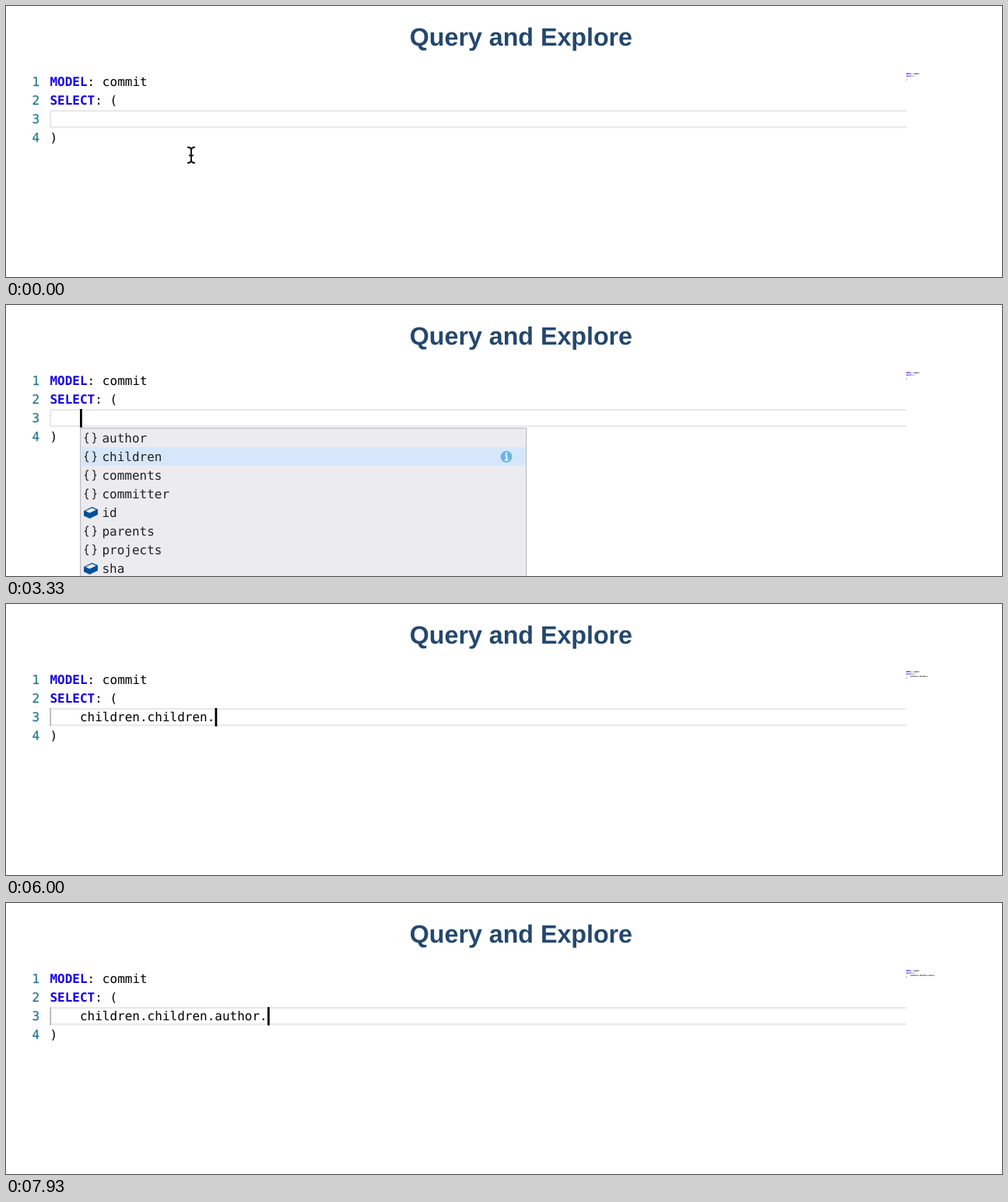
An HTML page for the animation above (8 s loop, 1280 by 349 pixels).

```html
<!DOCTYPE html>
<html lang="en">
<head>
<meta charset="utf-8">
<title>Query and Explore</title>
<style>
  html, body { margin: 0; width: 100%; height: 100%; overflow: hidden; background: #fff; }
  svg { display: block; width: 100%; height: 100%; }
  text { font: 16px "DejaVu Sans Mono", monospace; white-space: pre; text-rendering: geometricPrecision; }
  .title { font: bold 32.2px "Liberation Sans", Arial, sans-serif; fill: #24476f; }
  .num { fill: #237893; stroke: #237893; stroke-width: .25; }
  .key { font-weight: bold; fill: #1500e6; }
  .item { fill: #222; }
  .mini text { stroke: #000; stroke-width: .6; }
  .mini .key { stroke: #1500e6; }
</style>
</head>
<body>
<svg viewBox="0 0 1280 349">
  <defs>
    <path id="braces" fill="none" stroke="#333" stroke-width="1.4"
      d="M6 -6.5Q3.3 -6.5 3.3 -4.2V-2Q3.3 0 1 0Q3.3 0 3.3 2V4.2Q3.3 6.5 6 6.5M11.2 -6.5Q13.9 -6.5 13.9 -4.2V-2Q13.9 0 16.2 0Q13.9 0 13.9 2V4.2Q13.9 6.5 11.2 6.5"/>
    <g id="cube">
      <path fill="#00529b" d="M0 -2.2L10.5 -7.5L18 -4.2V2.6L7.5 7.6L0 4Z"/>
      <path fill="#eef2f8" d="M2.3 -2.1L10.5 -6L15.7 -3.7L7.5 .3Z"/>
    </g>
  </defs>
  <text class="title" x="518.8" y="51">Query and Explore</text>

  <path d="M1157 135.2H57.2V156.2H1157" fill="none" stroke="#e9e9e9" stroke-width="2.2"/>
  <path id="guide" d="M57.2 134V157.3" stroke="#b4b4b4" stroke-width="1.5"/>
  <g id="code"></g>
  <g id="mini" class="mini"></g>

  <g id="mouse" fill="none" stroke-linecap="round">
    <path id="beam" stroke="#fff" stroke-width="4"
      d="M233.8 182Q238 182 238 186Q238 182 242.2 182M238 185V199M233.8 202Q238 202 238 198Q238 202 242.2 202M235.8 192.5H240.2"/>
    <use href="#beam"/>
    <path stroke="#111" stroke-width="1.9"
      d="M233.8 182Q238 182 238 186Q238 182 242.2 182M238 185V199M233.8 202Q238 202 238 198Q238 202 242.2 202M235.8 192.5H240.2"/>
  </g>

  <g id="popup">
    <rect x=".6" y="158.6" width="573" height="230" fill="#ecebf0" stroke="#bfbfc2" stroke-width="1.2"/>
    <rect id="hover" x="1.2" y="183" width="571.8" height="24" fill="#eeeeee"/>
    <g id="mark">
      <rect x="1.2" y="159.2" width="571.8" height="23.8" fill="#d6e7fb"/>
      <circle cx="548" cy="171.4" r="7.4" fill="#69b5e7"/>
      <path d="M546.4 170H548.4V175.4M546 175.6H550.4" fill="none" stroke="#fff" stroke-width="1.6"/>
      <circle cx="548" cy="167.3" r="1.2" fill="#fff"/>
    </g>
    <g id="items"></g>
  </g>
  <rect id="caret" y="134" width="2.8" height="23.6"/>
</svg>
<script>
const LOOP = 8000, ADVANCE = 9.64, CODE_X = 56.4, CARET_X = 95, ROW = 24;
const $ = id => document.getElementById(id);
const NS = "http://www.w3.org/2000/svg";

function add(parent, tag, attrs, content = "") {
  const el = document.createElementNS(NS, tag);
  for (const k in attrs) el.setAttribute(k, attrs[k]);
  el.textContent = content;
  return parent.appendChild(el);
}

// Each line: keyword, plain text
const lines = [["MODEL", ": commit"], ["SELECT", ": ("], ["", ""], ["", ")"]];

function writeLine(parent, x, y, [key, rest]) {
  if (key) add(parent, "text", { class: "key", x, y }, key);
  return add(parent, "text", { x: x + key.length * ADVANCE, y }, rest);
}

const edits = [];
lines.forEach((line, i) => {
  const y = 103 + i * ROW;
  add($("code"), "text", { class: "num", x: 33.6, y }, i + 1);
  const el = writeLine($("code"), CODE_X, y, line);
  const g = add($("mini"), "g", { transform: `translate(1157 ${88.2 + i * 2.75}) scale(.134)` });
  const small = writeLine(g, 0, 0, line);
  if (i === 2) edits.push(el, small);
});

["author", "children", "comments", "committer", "id", "parents", "projects", "sha"].forEach((name, i) => {
  const cube = name === "id" || name === "sha";
  add($("items"), "use", { href: cube ? "#cube" : "#braces", x: 5, y: 171.4 + i * ROW });
  add($("items"), "text", { class: "item", x: 28.4, y: 177 + i * ROW }, name);
});

// Time, property, value
const steps = [
  [0, "text", ""], [0, "caret", 0], [0, "row", -1], [0, "mouse", 1], [0, "hover", 1],
  [70, "caret", 1], [130, "mouse", 0],
  [600, "caret", 0], [930, "row", 0], [1130, "caret", 1], [1600, "caret", 0],
  [2130, "caret", 1], [2400, "row", 1], [2400, "hover", 0],
  [2670, "caret", 0], [2730, "row", 2], [3200, "caret", 1], [3330, "row", 1],
  [3530, "row", -1], [3530, "text", "children"], [4070, "text", "children."],
  [4600, "caret", 0], [4870, "row", 0], [5130, "caret", 1], [5330, "row", 1], [5600, "caret", 0],
  [5730, "row", -1], [5730, "caret", 1], [5730, "text", "children.children"],
  [6000, "text", "children.children."], [6470, "row", 0],
  [6530, "caret", 0], [7070, "caret", 1],
  [7530, "row", -1], [7530, "text", "children.children.author"],
  [7930, "text", "children.children.author."]
];

const show = (id, on) => $(id).setAttribute("visibility", on ? "inherit" : "hidden");

function draw(t) {
  const s = {};
  for (const [at, prop, value] of steps) if (at <= t) s[prop] = value;
  const x = CARET_X + s.text.length * ADVANCE;
  for (const el of edits) el.textContent = s.text && "    " + s.text;
  $("caret").setAttribute("x", x);
  $("popup").setAttribute("transform", `translate(${x} 0)`);
  $("mark").setAttribute("transform", `translate(0 ${Math.max(s.row, 0) * ROW})`);
  show("caret", s.caret);
  show("popup", s.row >= 0);
  show("hover", s.hover);
  show("mouse", s.mouse);
  show("guide", s.text);
}

const start = performance.now();
function tick() {
  draw((performance.now() - start) % LOOP);
  requestAnimationFrame(tick);
}
tick();
</script>
</body>
</html>
```
